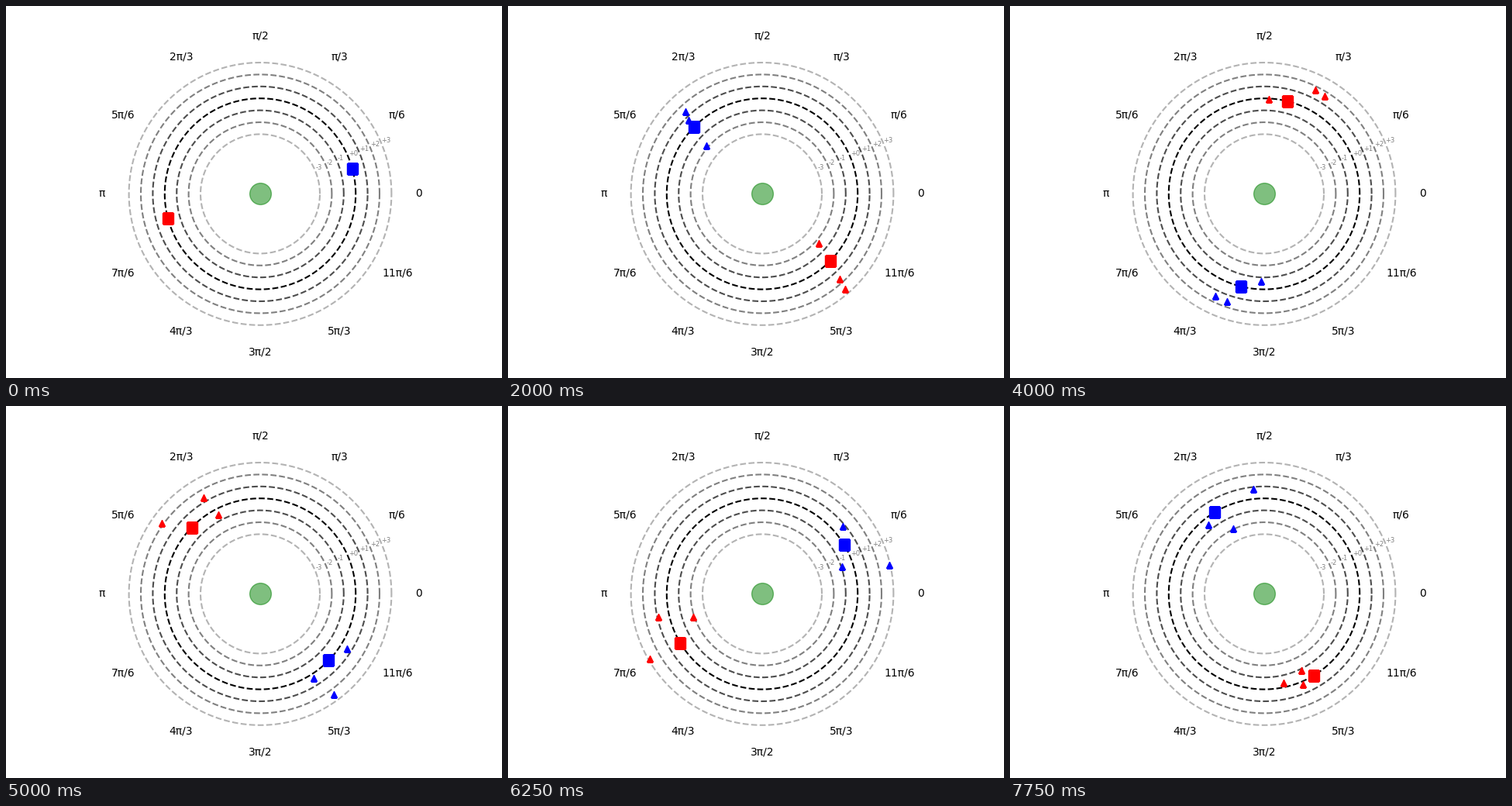
Write a matplotlib script that moves like this. It is 640 px wide and 480 px high and loops after 8 s.

```python
import numpy as np
import matplotlib.pyplot as plt
from matplotlib.animation import FuncAnimation

FRAMES, INTERVAL = 32, 250
ORBIT = 8                          # radius of the main orbit
STEP = 2 * np.pi * 15 / 359        # orbital angle per frame
KEY_GAP = 6                        # frames between radial key points
LAG = np.radians(0.66)             # higher orbits fall behind by this rate

# Each follower: drift, then its radial offset at every key point after the start
BLUE = [(0.10, 0.95, 1.99, 0.95, -0.72, -1.8),
        (0.22, 0.55, 1.0, 1.95, 3.02, 1.28),
        (-0.085, -1.35, -1.97, 0.05, 0.95, -0.25)]
RED = [(-0.04, -1.2, -1.88, 1.15, 3.0, 0.75),
       (0.18, 1.25, 2.0, 1.5, 1.03, -0.15),
       (0.27, 1.85, 3.05, 0.6, -1.85, -1.15)]

frames = np.arange(FRAMES)


def spline(y):
    """Cubic spline through even key points: at rest first, natural at the end."""
    size = len(y)
    a = 4 * np.eye(size) + np.eye(size, k=1) + np.eye(size, k=-1)
    a[0, 0] = 2
    a[-1, -2:] = 0, 1
    rhs = np.zeros(size)
    rhs[0] = 6 * (y[1] - y[0])
    rhs[1:-1] = 6 * np.diff(y, 2)
    bend = np.linalg.solve(a, rhs) / 6

    k = np.minimum(frames // KEY_GAP, size - 2)
    u = frames / KEY_GAP - k
    v = 1 - u
    return (v * y[k] + u * y[k + 1]
            + (v**3 - v) * bend[k] + (u**3 - u) * bend[k + 1])


def follow(drift, *keys):
    """Radial offset and the angle it builds up by orbiting faster or slower."""
    radial = spline(np.array([0, *keys]))
    area = np.cumsum(radial) - radial / 2
    return radial, LAG * (drift * frames - area)


fig = plt.figure(figsize=(6.4, 4.8), dpi=100)
ax = fig.add_subplot(projection="polar")
ax.set_ylim(0, 12)
ax.grid(False)
ax.spines["polar"].set_visible(False)

angle_names = ["0", "π/6", "π/3", "π/2", "2π/3", "5π/6",
               "π", "7π/6", "4π/3", "3π/2", "5π/3", "11π/6"]
ax.set_xticks(np.arange(12) * np.pi / 6, labels=angle_names)
levels = range(-3, 4)
ax.set_yticks([ORBIT + k for k in levels], labels=[f"{k:+d}" for k in levels],
              color="gray", fontsize=6)

circle = np.linspace(0, 2 * np.pi, 200)
shades = ["0", "0.3", "0.5", "0.7"]
for k in levels:
    ax.plot(circle, np.full_like(circle, ORBIT + k), "--", color=shades[abs(k)])
ax.plot([0], [0], "o", color="green", ms=20, alpha=0.5)

movers = []                        # (artist, angles, radii)


def add_mover(marker, size, color, angles, radii):
    mark, = ax.plot([], [], marker, color=color, ms=size)
    movers.append((mark, angles, radii))


for color, phase, followers in [("blue", 0, BLUE), ("red", np.pi, RED)]:
    angle = phase + STEP * (frames + 1)
    for follower in followers:
        radial, angular = follow(*follower)
        add_mover("^", 6, color, angle + angular, ORBIT + radial)
    add_mover("s", 10, color, angle, np.full(FRAMES, ORBIT))


def update(n):
    for mark, angles, radii in movers:
        mark.set_data([angles[n]], [radii[n]])
    return [mover[0] for mover in movers]


anim = FuncAnimation(fig, update, frames=FRAMES, interval=INTERVAL, repeat=True)
plt.show()
```
